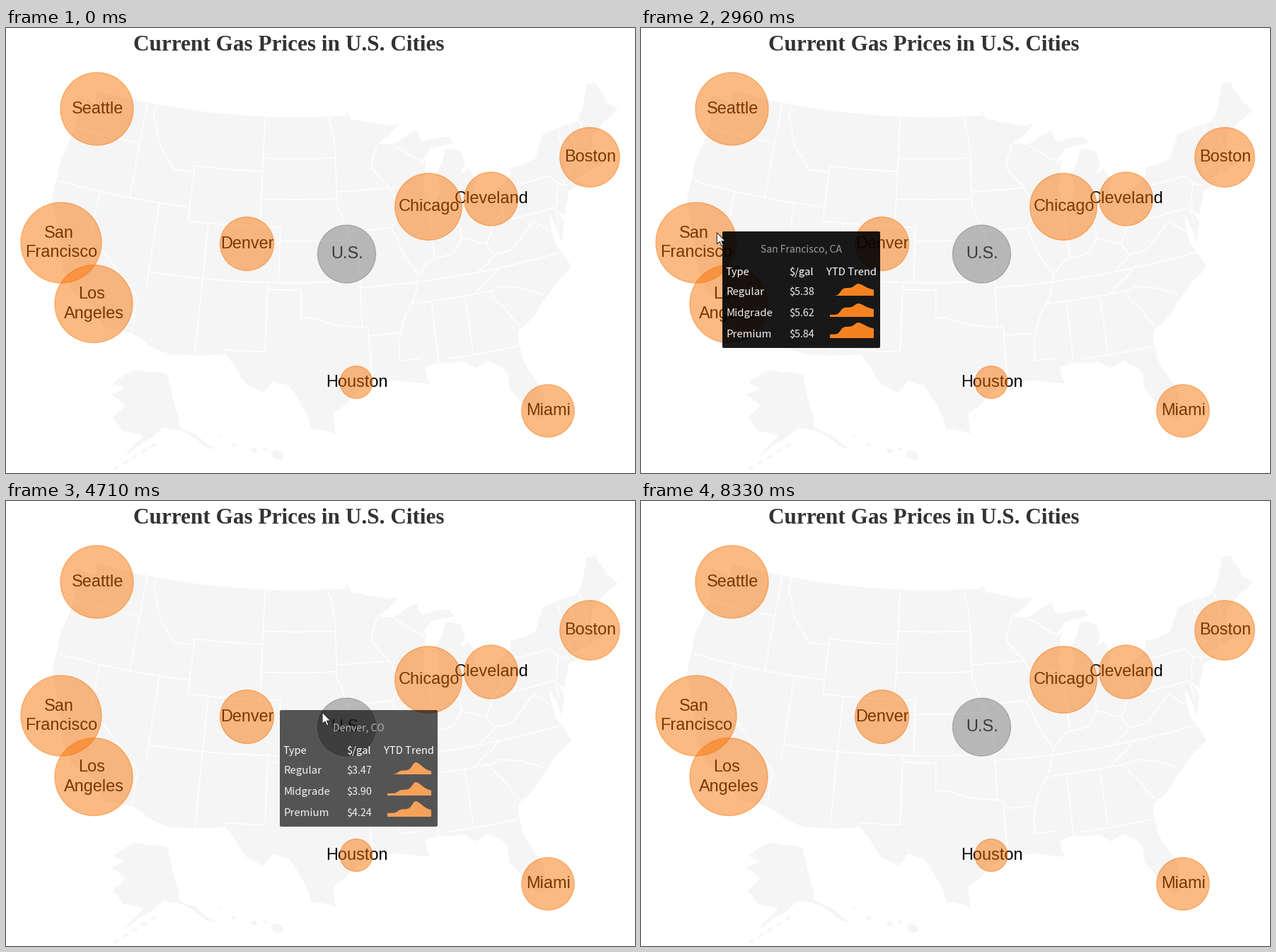
Recreate the animation shown at these times as a matplotlib script. Size 889 by 630 pixels, loop 8.97 s.

```python
import numpy as np
import matplotlib.pyplot as plt
from matplotlib.animation import FuncAnimation
from matplotlib.collections import LineCollection
from matplotlib.colors import to_rgb
from matplotlib.patches import Circle, Ellipse, FancyBboxPatch, Polygon
from matplotlib.transforms import Affine2D

W, H, DPI = 889, 630, 64
LOOP, TICK, STEP = 8970, 30, 70
PX = 72 / DPI
ORANGE, GREY, LAND = (0.976, 0.447, 0.01), (0.47, 0.47, 0.47), "#f5f5f5"
rng = np.random.default_rng(4)

fig = plt.figure(figsize=(W / DPI, H / DPI), dpi=DPI, facecolor="white")
ax = fig.add_axes([0, 0, 1, 1])
ax.set_xlim(0, W)
ax.set_ylim(H, 0)
ax.axis("off")


def label(x, y, s, px, font="Liberation Sans", **kw):
    return ax.text(x, y, s, fontsize=px * PX, family=font, va="baseline", **kw)


# ---------- map: conic projection of longitude / latitude ----------
def project(points):
    lon, lat = np.radians(np.asarray(points, float)).T
    p1, p2 = np.sin(np.radians([29.5, 45.5]))
    n = (p1 + p2) / 2
    rho = np.sqrt(1 - p1 ** 2 + 2 * n * p1 - 2 * n * np.sin(lat)) / n
    ang = n * (lon + np.radians(100.73))
    x = 403.7 + 1115 * rho * np.sin(ang)
    y = 1115 * rho * np.cos(ang) - 1102.2
    bend = 7 * ((x - 420) / 380) ** 2 * np.clip((560 - y) / 400, 0, 1.3)
    return np.column_stack([x + 0.015 * (500 - y), y - bend])


def rough(points, amount=0.06, rounds=2):
    """Break each segment at its middle, pushed a little sideways."""
    pts = np.asarray(points, float)
    for _ in range(rounds):
        step = np.diff(pts, axis=0)
        side = step[:, ::-1] * [-1, 1] * rng.uniform(-amount, amount, (len(step), 1))
        out = np.empty((2 * len(pts) - 1, 2))
        out[::2] = pts
        out[1::2] = pts[:-1] + step / 2 + side
        pts = out
    return pts


def parallel(lat, west, east):
    return project([(lon, lat) for lon in np.linspace(west, east, 16)])


def meridian(lon, south, north):
    return project([(lon, south), (lon, north)])


EAST_SIDE = [
    (-95.15, 49.4), (-94.6, 48.7), (-91.4, 48.1), (-89.6, 48), (-92, 46.8), (-90.4, 46.6),
    (-87.8, 47.4), (-87.4, 46.5), (-84.4, 46.5), (-84.1, 46), (-86.6, 45.9), (-88, 44.6),
    (-87.1, 45.2), (-87.8, 43), (-87.5, 41.7), (-86.8, 41.8), (-86.2, 42.7), (-86.4, 44),
    (-85, 45.7), (-83.5, 45.3), (-83.3, 44.3), (-83.9, 43.7), (-83, 44), (-82.5, 43),
    (-83.4, 41.7), (-81.7, 41.5), (-79, 42.8), (-79, 43.3), (-76.3, 43.5), (-75, 45),
    (-71.3, 45.1), (-70.3, 45.9), (-69.2, 47.4), (-68.2, 47.3), (-67.8, 45.7), (-67, 44.8),
    (-70.2, 43.7), (-70.8, 42.7), (-70.5, 41.8), (-70, 42), (-70, 41.6), (-73.6, 41),
    (-72, 41), (-74, 40.5), (-74.9, 39), (-75.5, 39.5), (-75.1, 38.4), (-75.9, 37.2),
    (-76.2, 39.3), (-76.4, 37.2), (-75.5, 35.3), (-77.9, 33.9), (-81.2, 31.8), (-81.3, 29.8),
    (-80.1, 26.8), (-80.4, 25.2),
]
SOUTH_WEST = [
    (-81.1, 25.2), (-82.8, 27.8), (-82.7, 28.9), (-84.1, 30.1), (-85.3, 29.7), (-86.2, 30.35),
    (-89.5, 30.3), (-89.2, 29.1), (-91.8, 29.6), (-93.8, 29.7), (-95.3, 28.9), (-97.3, 27.5),
    (-97.15, 25.95), (-99.1, 26.4), (-101, 29.6), (-102.3, 29.9), (-103.1, 29), (-104.5, 29.6),
    (-106.5, 31.75), (-108.2, 31.5), (-111.07, 31.33), (-114.8, 32.5), (-117.1, 32.53),
    (-118.5, 34), (-120.6, 34.6), (-122.4, 37.3), (-124.3, 40.4), (-124.5, 42.8), (-124, 46.2),
    (-124.7, 48.35), (-122.7, 48.1), (-122.4, 47.4), (-122.75, 49),
]
# latitude, west end, east end
PARALLELS = [
    (46, -124, -117), (42, -124.2, -111.05), (37, -114.05, -94.6), (45, -111.05, -104.05),
    (41, -111.05, -102.05), (45.95, -104.05, -96.5), (43, -104.05, -96.5), (40, -102.05, -95.3),
    (43.5, -96.5, -91.2), (40.6, -95.7, -91.4), (36.5, -103.05, -100), (36.5, -94.6, -75.9),
    (33, -94.05, -91.15), (42.5, -90.6, -87.8), (41.7, -87.5, -83.4), (35, -90.2, -82.3),
    (39.72, -80.52, -75.6), (42, -79.8, -75.3), (31, -91.6, -89.7), (30.7, -87.6, -81.5),
    (42.03, -73.5, -71.2), (42.73, -73.3, -70.8), (32, -106.6, -103.05),
]
# longitude, south end, north end
MERIDIANS = [
    (-117.03, 42, 49), (-120, 39, 42), (-114.05, 36, 42), (-111.05, 41, 45), (-104.05, 41, 49),
    (-109.05, 31.3, 41), (-102.05, 37, 41), (-103.05, 32, 37), (-100, 34.5, 36.5),
    (-94.6, 33.6, 39.1), (-94.05, 32, 33.6), (-96.5, 42.5, 46), (-87.53, 38, 41.7),
    (-84.8, 39.1, 41.7), (-88.3, 30.4, 35), (-85.3, 31, 35), (-80.52, 39.7, 42),
    (-75.6, 38.4, 39.7), (-73.4, 41.1, 45), (-71.85, 41.3, 42), (-71, 43, 45.3),
    (-72.2, 42.7, 45),
]
RIVERS = [
    [(-120, 39), (-114.6, 35), (-114.7, 32.6)],
    [(-116.05, 49), (-116.05, 48), (-114.4, 45.6), (-113, 44.5), (-111.05, 44.5)],
    [(-97.2, 49), (-96.5, 46)],
    [(-96.5, 42.5), (-95.3, 40), (-94.6, 39.1)],
    [(-100, 34.5), (-97, 33.9), (-94.05, 33.6)],
    [(-94.05, 32), (-93.8, 29.7)],
    [(-92.1, 46.7), (-92.8, 45), (-91.2, 43.5), (-90.2, 41.8), (-91.3, 40.5), (-89.2, 37),
     (-91.1, 33.5), (-91.6, 31)],
    [(-90.4, 46.5), (-87.6, 45.1)],
    [(-89.1, 37), (-88, 37.9), (-85.7, 38.2), (-84.8, 39.1), (-82.6, 38.4), (-80.6, 40.5)],
    [(-83.7, 36.6), (-82, 37.5), (-82.6, 38.4)],
    [(-82, 37.5), (-80.3, 37.6), (-77.8, 39.2), (-76.3, 38)],
    [(-84.3, 35), (-83, 35.8), (-81.7, 36.6)],
    [(-82.3, 35.2), (-80.8, 34.9), (-78.5, 33.9)],
    [(-83.1, 35), (-81, 32.1)],
    [(-75.3, 42), (-74.7, 41.3), (-75.4, 39.7)],
    [(-74.7, 41.3), (-73.9, 41)],
]
# already in pixels
ALASKA = [
    (171, 489), (183, 484), (213, 487), (229, 491), (237, 529), (245, 565), (266, 574), (305, 600),
    (284, 594), (256, 574), (222, 566), (206, 580), (168, 606), (194, 578), (164, 570), (151, 552),
    (169, 534), (148, 519), (168, 510), (152, 502),
]


def land(shape):
    shape.set(facecolor=LAND, edgecolor="none", zorder=1)
    ax.add_patch(shape)


coast = rough(project(EAST_SIDE + SOUTH_WEST))
land(Polygon(np.vstack([parallel(49, -122.75, -95.15), coast])))
land(Polygon(rough(ALASKA)))
for k in range(5):
    land(Ellipse((208 - 13 * k, 591 + 8 * k), 9, 4, angle=-35))
for x, y, size in [(322, 590, 7), (301, 577, 4), (351, 598, 9), (366, 596, 6), (384, 605, 17)]:
    land(Ellipse((x, y), size, 0.7 * size, angle=25))

borders = [parallel(*p) for p in PARALLELS] + [meridian(*m) for m in MERIDIANS]
borders += [rough(project(r)) for r in RIVERS]
ax.add_collection(LineCollection(borders, colors="white", linewidths=1.5 * PX, zorder=2))

# ---------- title, bubbles ----------
label(180, 32, "Current Gas Prices in U.S. Cities", 31.3, "Liberation Serif",
      weight="bold", color="#333333")

BUBBLES = [
    ("Seattle", 128.5, 114.5, 52), ("San Francisco", 78, 304, 57.5),
    ("Los Angeles", 124, 390.5, 55.5), ("Denver", 340.5, 305.5, 38.5),
    ("U.S.", 481.5, 320, 41.5), ("Chicago", 597, 253, 47.8), ("Cleveland", 685.5, 242, 38.5),
    ("Boston", 825, 183, 42.7), ("Houston", 495, 501.5, 23.5), ("Miami", 766, 542, 37.7),
]
for city, x, y, r in BUBBLES:
    words = city.split()
    for k, word in enumerate(words):
        row = k - (len(words) - 1) / 2
        indent = -3 if row < 0 else 0.5
        label(x + indent, y + 6.4 + 27.4 * row, word, 23.5, ha="center", color="black", zorder=3)
    ax.add_patch(Circle((x, y), r - 0.5, color=GREY if city == "U.S." else ORANGE,
                        alpha=0.49, lw=1.3 * PX, zorder=4))

# ---------- tooltip ----------
TIP_W, TIP_H = 223, 165
# name, prices, first shown, last moved, plateau of the trend
TIPS = [
    ("Seattle, WA", (4.67, 5.13, 5.15), 1040, 1895, 0.42),
    ("San Francisco, CA", (5.38, 5.62, 5.84), 2280, 3170, 0.65),
    ("Denver, CO", (3.47, 3.90, 4.24), 3670, 4480, 0.33),
    ("U.S.", (3.69, 4.22, 4.55), 4780, 6010, 0.42),
    ("Chicago, IL", (4.21, 4.69, 5.13), 6150, 7420, 0.42),
]
# name, baseline, height of the trend, its lowest share
ROWS = [("Regular", 90, 17, 0), ("Midgrade", 120, 19, 0.16), ("Premium", 150, 22, 0.24)]
GRID = np.linspace(0, 1, 32)

shift = Affine2D()
place = shift + ax.transData
box = FancyBboxPatch((1.5, 1.5), TIP_W - 3, TIP_H - 3, boxstyle="round,pad=1.5,rounding_size=2",
                     fc="black", ec="none", transform=place, zorder=10)
ax.add_patch(box)


def tip_text(x, y, s, px=15, **kw):
    return label(x, y, s, px, "Noto Sans CJK JP", transform=place, zorder=12, **kw)


heading = tip_text(TIP_W / 2, 29, "", 14, ha="center")
heads = [tip_text(x, 62, s, 14.6) for x, s in ((5, "Type"), (94, "$/gal"), (147, "YTD Trend"))]
names = [tip_text(5, row[1], row[0]) for row in ROWS]
prices = [tip_text(94, row[1], "", 14.4) for row in ROWS]
trends = [Polygon([(0, 0), (1, 0), (1, 1)], transform=place, zorder=11) for _ in ROWS]
for trend in trends:
    ax.add_patch(trend)
parts = [box, heading] + heads + names + prices + trends


def trend_curve(plateau):
    rise = plateau / (1 + np.exp((0.24 - GRID) / 0.03)) * np.clip(1.5 - 0.75 * GRID, 0, 1)
    width = np.where(GRID < 0.64, 0.1, 0.2)
    curve = rise + (1 - plateau) * np.exp(-((GRID - 0.64) / width) ** 2)
    return curve / curve.max()


# ---------- pointer ----------
ARROW = np.array([(0, 0), (0, 16.5), (3.9, 13), (6.6, 19), (9, 18), (6.4, 12.2), (11.6, 12)])
pointer = Polygon(ARROW, closed=True, fc="white", ec="#222222", lw=PX, zorder=20)
ax.add_patch(pointer)

ENTER, LEAVE = 130, 8330
STARTS = np.array([0, ENTER, 1040, 1860, 2960, 4150, 5060, 5870, 7350])
PATH = np.array([
    (130, 865, 611), (970, 151, 159), (1180, 146, 146), (1790, 146, 146), (1895, 147, 163),
    (2140, 129, 223), (2420, 105, 289), (2890, 105, 289), (3170, 133, 293), (3590, 298, 294),
    (3950, 332, 299), (4150, 332, 299), (4480, 379, 298), (4710, 447, 299), (5400, 478, 310),
    (5800, 478, 310), (6010, 514, 301), (6080, 549, 281), (6360, 584, 264), (7280, 584, 264),
    (7350, 587, 269), (8190, 866, 599), (8260, 870, 611),
], float)
TIMES, SPOTS = PATH[:, 0], PATH[:, 1:]
speed = np.diff(SPOTS, axis=0) / np.diff(TIMES)[:, None]
before, after = speed[:-1], speed[1:]
same = before * after > 0
SLOPES = np.zeros_like(SPOTS)
SLOPES[1:-1] = np.where(same, 2 * before * after / np.where(same, before + after, 1), 0)


def spot(t):
    """Smooth path through the key points, without overshoot."""
    i = int(np.clip(np.searchsorted(TIMES, t, "right") - 1, 0, len(TIMES) - 2))
    h = TIMES[i + 1] - TIMES[i]
    u = np.clip((t - TIMES[i]) / h, 0, 1)
    s = u * u * (3 - 2 * u)
    bend = SLOPES[i] * (1 - u) - SLOPES[i + 1] * u
    return SPOTS[i] * (1 - s) + SPOTS[i + 1] * s + h * u * (1 - u) * bend


def fade(t, moved):
    return float(np.clip((553 - (t - moved)) / 440, 0, 1))


def opacity(t, shown):
    alpha = min(1, 0.4 + (t - shown[-1][2]) / 200)
    if len(shown) > 1:
        alpha = max(alpha, fade(t, shown[-2][3]))
    return min(alpha, fade(t, shown[-1][3]))


def draw(i):
    t = i * TICK + 20
    start = STARTS[STARTS <= t].max()
    t = start + (t - start) // STEP * STEP
    pointer.set_visible(bool(ENTER <= t < LEAVE))
    pointer.set_xy(ARROW + spot(t))

    shown = [tip for tip in TIPS if tip[2] <= t]
    alpha = opacity(t, shown) if shown else 0
    for part in parts:
        part.set_visible(alpha > 0)
    if alpha > 0:
        name, costs, _, moved, plateau = shown[-1]
        x, y = spot(min(t, moved))
        shift.clear().translate(round(x) + 8, round(y) - 2)
        box.set_alpha(0.9 * alpha)

        # the whole card fades as one, so inks blend toward the land behind it
        def tint(color):
            return alpha * np.array(to_rgb(color)) + (1 - alpha) * np.array(to_rgb(LAND))

        heading.set(text=name, color=tint("#9c9c9c"))
        for head in heads:
            head.set_color(tint("white"))
        for text in names + prices:
            text.set_color(tint("#eeeeee"))
        curve = trend_curve(plateau)
        for price, cost, trend, (_, base, tall, low) in zip(prices, costs, trends, ROWS):
            price.set_text(f"\\${cost:.2f}")
            top = base + 1 - tall * (low + (1 - low) * curve)
            trend.set_xy([(152, base + 1), *zip(152 + 62 * GRID, top), (214, base + 1)])
            trend.set_color(tint("#8c8c8c" if name == "U.S." else "#f58220"))
            trend.set_linewidth(0)
    return [pointer] + parts


anim = FuncAnimation(fig, draw, frames=LOOP // TICK, interval=TICK, repeat=True,
                     repeat_delay=0, blit=False)
plt.show()
```
